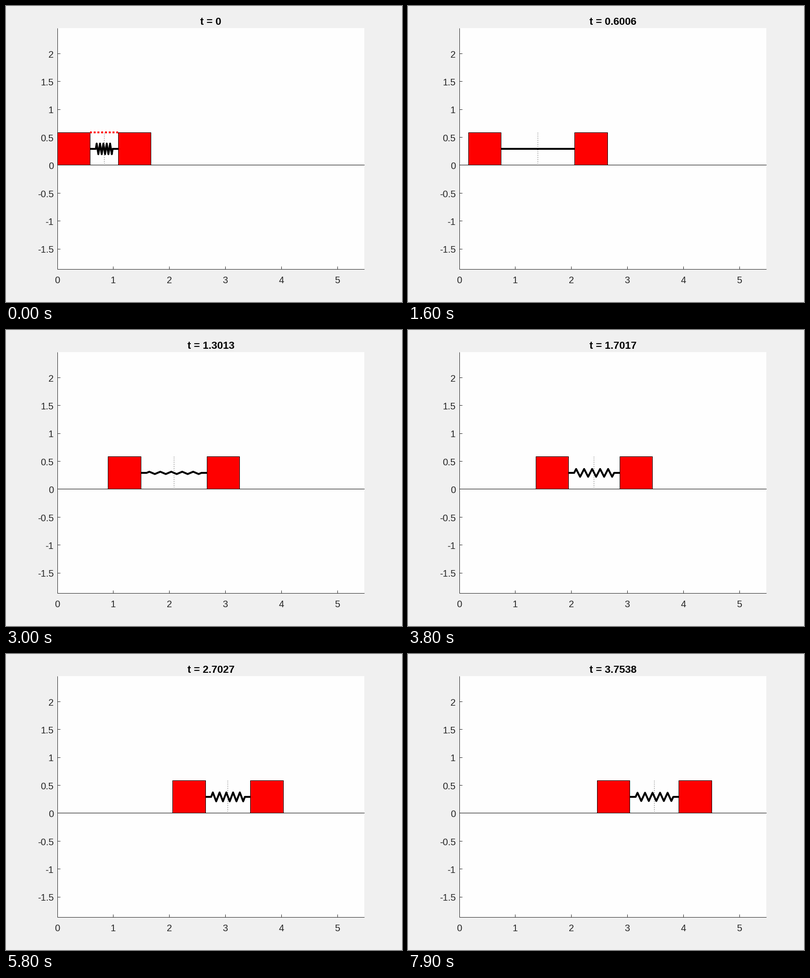
Animation of 840 by 630 pixels, one loop 8000 ms. Source, as a matplotlib script:

```python
import math

import matplotlib.pyplot as plt
from matplotlib.animation import FuncAnimation
from matplotlib.patches import Rectangle

W, H, DPI = 840, 630, 100
FRAMES, INTERVAL, HOLD = 80, 100, 4
LEFT, RIGHT, TOP, BOTTOM = 109, 760, 47, 560
X0, Y0, UNIT = 108.65, 338.35, 118.8

SIDE = 0.585        # block size
REST = 1.0          # spring rest length
START = 0.5         # compressed length
STIFF = 25.0        # k / m
FRICTION = 0.471    # mu * g
DT = 50 / 999       # model time per frame
SUB = 500

INK = "#262626"


def px(x):
    return X0 + UNIT * x


def py(y):
    return Y0 - UNIT * y


def pt(pixels):
    return pixels * 72 / DPI


def rub(v, dv):
    """Dry friction: slow v down without reversing it."""
    return math.copysign(max(abs(v) - dv, 0), v)


def simulate(count):
    """Left edge and spring length for each model step."""
    h = DT / SUB
    a, b, va, vb = 0.0, START, 0.0, 0.0
    states = [(a, b - a)]
    for _ in range(count):
        for _ in range(SUB):
            pull = STIFF * (b - a - REST)
            va = rub(va + pull * h, FRICTION * h)
            vb = rub(vb - pull * h, FRICTION * h)
            a += va * h
            b += vb * h
            if a < 0:
                a = va = 0.0
        states.append((a, b - a))
    return states


def spring_points(x, length):
    """Five coils between two straight ends; coils flatten when stretched."""
    end, coils = 0.1, 5
    w = length - 2 * end
    amp = 0.1 * math.sqrt(max(0, 1 - w * w))
    mid = SIDE / 2
    xs, ys = [x, x + end], [mid, mid]
    for i in range(2 * coils):
        xs.append(x + end + w * (2 * i + 1) / (4 * coils))
        ys.append(mid + amp * (-1) ** i)
    xs += [x + end + w, x + length]
    ys += [mid, mid]
    # unsnapped line: move to pixel centres like the snapped ones
    return [px(v) + .5 for v in xs], [py(v) + .5 for v in ys]


states = simulate(FRAMES - 1 - HOLD)

plt.rcParams["font.family"] = "Liberation Sans"
fig = plt.figure(figsize=(W / DPI, H / DPI), dpi=DPI, facecolor="#f0f0f0")
ax = fig.add_axes([0, 0, 1, 1])
ax.set_xlim(0, W)
ax.set_ylim(H, 0)
ax.axis("off")


def line(xs, ys, color="black", width=1, **kw):
    kw.setdefault("solid_capstyle", "butt")
    return ax.plot(xs, ys, color=color, lw=pt(width), **kw)[0]


def label(x, y, text, ha, size=20, **kw):
    return ax.text(x, y, text, ha=ha, va="baseline", fontsize=pt(size), **kw)


ax.add_patch(Rectangle((LEFT, TOP), RIGHT - LEFT, BOTTOM - TOP,
                       fc="#fefefe", ec="none", zorder=0))
line([LEFT, LEFT], [TOP, BOTTOM], INK, snap=True)
line([LEFT, RIGHT], [BOTTOM, BOTTOM], INK, snap=True)
for i in range(6):
    line([px(i)] * 2, [BOTTOM - 6, BOTTOM], INK, snap=True)
    label(px(i), 590, str(i), "center", color=INK)
for i in range(-3, 5):
    y = py(i / 2)
    line([LEFT, LEFT + 6], [y, y], INK, snap=True)
    label(101, y + 8.8, f"{i / 2:g}", "right", color=INK)

blocks = [ax.add_patch(Rectangle((0, py(SIDE)), SIDE * UNIT, SIDE * UNIT,
                                 fc="red", ec="black", lw=pt(1), zorder=3,
                                 snap=True))
          for _ in range(2)]
line([LEFT, RIGHT], [Y0, Y0], zorder=4, snap=True)
# a half-pixel dash offset keeps each dot on one pixel
centre = line([], [], ls=(0.5, (1, 3)), zorder=4, snap=True,
              dash_capstyle="butt")
tie = line([], [], "red", 4, ls=(0, (1, 1)), zorder=5, dash_capstyle="butt")
spring = line([], [], width=4, zorder=5, solid_joinstyle="round")
title = label(434.8, 40, "", "center", 22, weight="bold", color="black")


def update(frame):
    n = max(0, frame - HOLD)
    x, length = states[n]
    inner = x + SIDE
    outer = inner + length
    blocks[0].set_x(px(x))
    blocks[1].set_x(px(outer))
    mid = px((inner + outer) / 2)
    centre.set_data([mid, mid], [py(0), py(SIDE)])
    spring.set_data(*spring_points(inner, length))
    tie.set_data([px(inner), px(outer)], [py(SIDE)] * 2)
    tie.set_visible(n == 0)
    title.set_text(f"t = {n * DT:.5g}")
    return [*blocks, centre, spring, tie, title]


anim = FuncAnimation(fig, update, frames=FRAMES, interval=INTERVAL,
                     init_func=lambda: update(0), repeat=True, repeat_delay=0)
plt.show()
```
